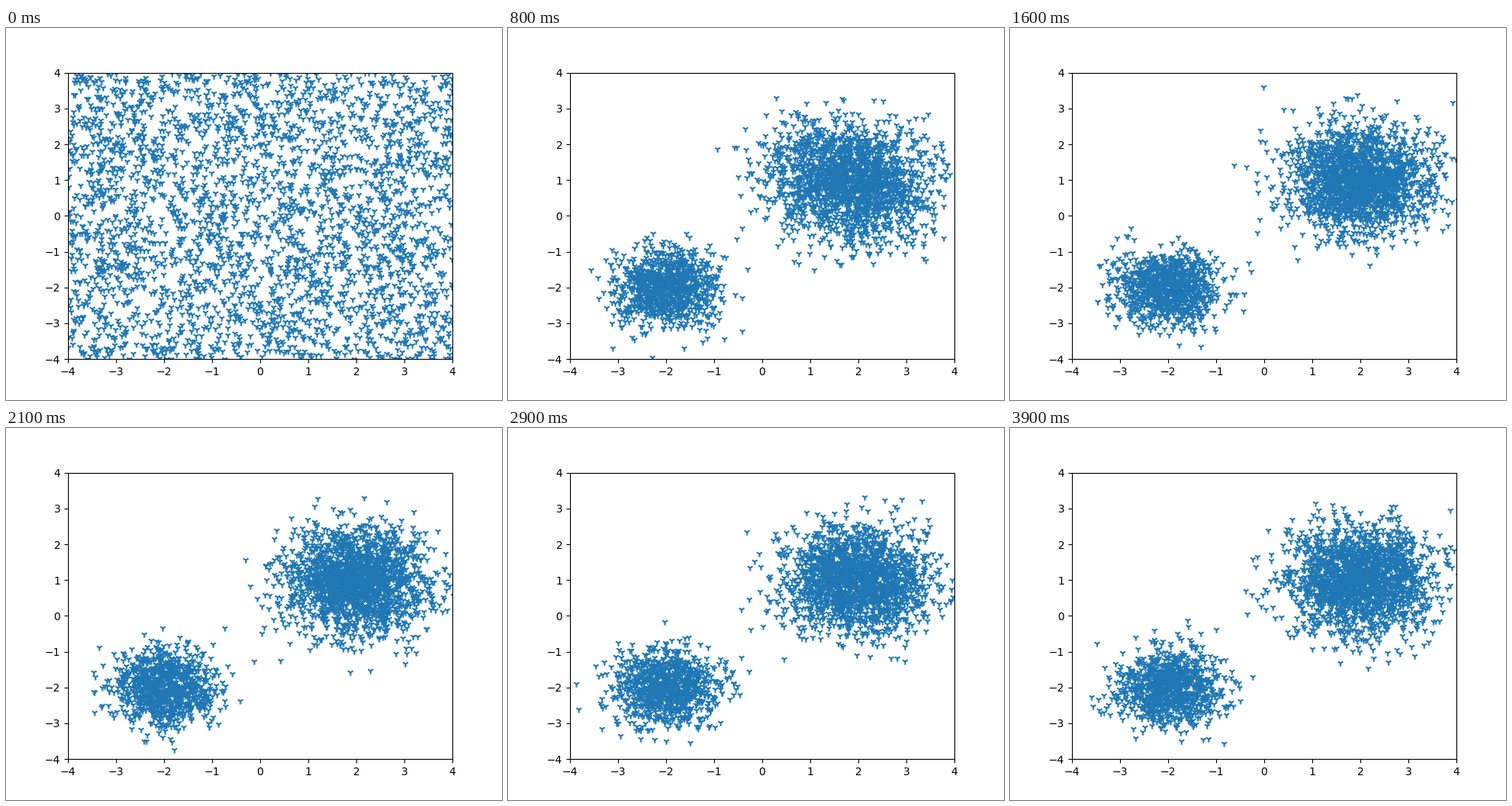
Write a matplotlib script that moves like this. It is 640 px wide and 480 px high and loops after 4 s.

```python
import numpy as np
import matplotlib.pyplot as plt
from matplotlib.animation import FuncAnimation

FRAMES = 40
INTERVAL = 100
POINTS = 3000
STEP = 0.05
STEPS_PER_FRAME = 2

MEANS = np.array([[-2.0, -2.0], [2.0, 1.0]])
VARS = np.array([0.25, 0.5])


def score(x):
    """Gradient of the log density of two equally weighted Gaussians."""
    diff = MEANS - x[:, None, :]
    log_p = -(diff ** 2).sum(axis=2) / (2 * VARS) - np.log(VARS)
    weight = np.exp(log_p - log_p.max(axis=1, keepdims=True))
    weight /= weight.sum(axis=1, keepdims=True)
    return ((weight / VARS)[:, :, None] * diff).sum(axis=1)


def langevin_path(seed=0):
    """Uniform start, then a few noisy gradient steps per frame."""
    rng = np.random.default_rng(seed)
    x = rng.uniform(-4, 4, (POINTS, 2))
    path = [x]
    for _ in range(FRAMES - 1):
        for _ in range(STEPS_PER_FRAME):
            noise = rng.standard_normal(x.shape)
            x = x + STEP * score(x) + np.sqrt(2 * STEP) * noise
        path.append(x)
    return path


path = langevin_path()

fig, ax = plt.subplots(figsize=(6.4, 4.8), dpi=100)
ax.set_xlim(-4, 4)
ax.set_ylim(-4, 4)
dots = ax.scatter(path[0][:, 0], path[0][:, 1], marker="1", color="tab:blue")


def update(i):
    dots.set_offsets(path[i])
    return (dots,)


anim = FuncAnimation(fig, update, frames=FRAMES, interval=INTERVAL,
                     repeat=True, repeat_delay=0)
plt.show()
```
